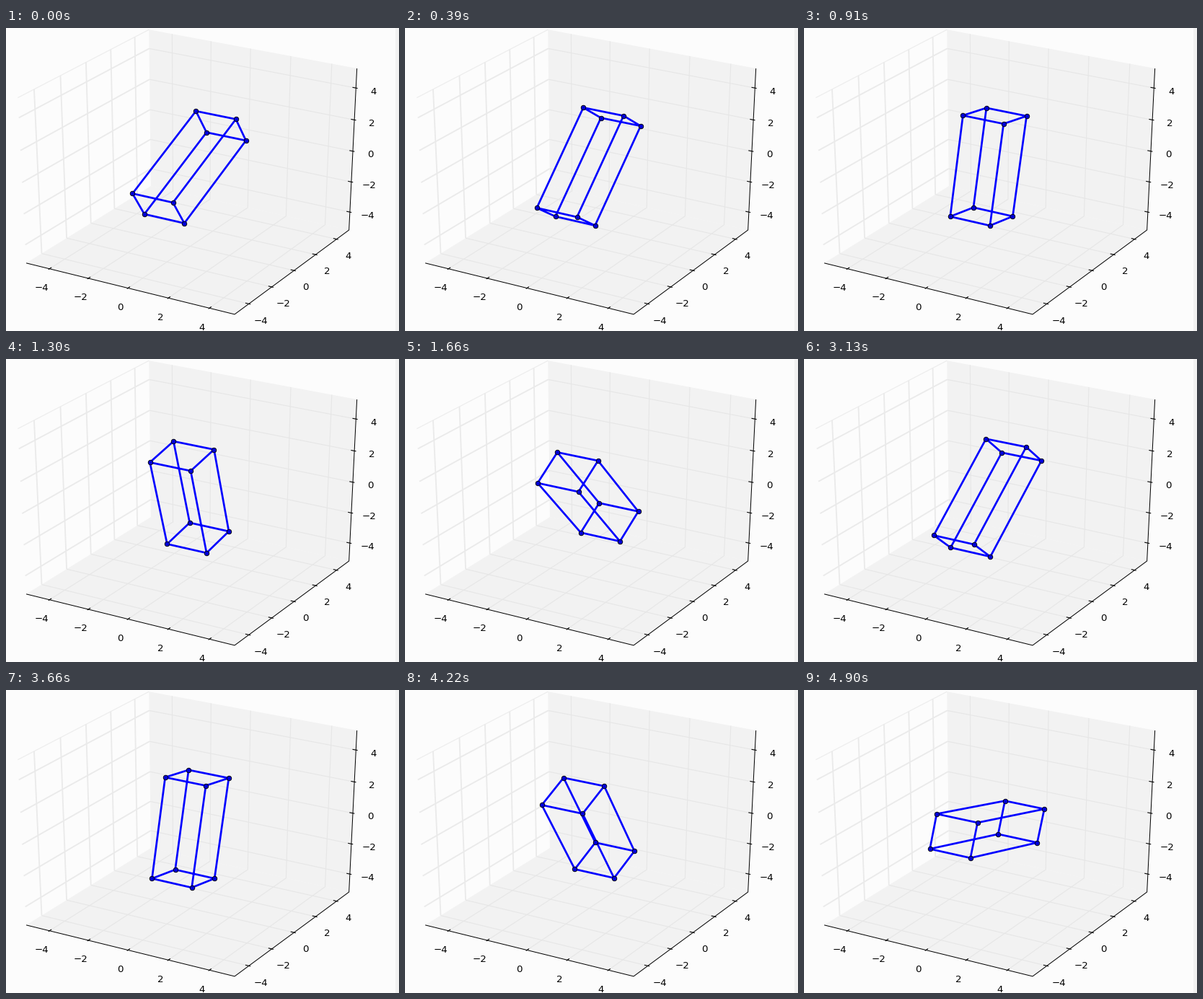
A matplotlib script that plays this animation: 545x420 px, repeating every 7.25 s.

```python
import numpy as np
import matplotlib.pyplot as plt
from matplotlib.animation import FuncAnimation

W, H, DPI = 545, 420, 100
PX = 72 / DPI                      # points per pixel
LOOP, TICK = 7250, 25              # ms

BG, PANE, GRID, GRID_LEFT = "#fcfcfc", "#f2f2f2", "#e6e6e6", "#eaeaea"
EDGE = 5 + 10 / 48                 # panes lie a little outside the limits
TICKS = range(-4, 5, 2)

# Camera: view angles, distance, pixel scale and centre
AZIM, ELEV, DIST = np.radians(59.5), np.radians(28.4), 10
SCALE = np.array([3215, -2471])
CENTER = np.array([255.4, 192.1])
sa, ca, se, ce = np.sin(AZIM), np.cos(AZIM), np.sin(ELEV), np.cos(ELEV)
RIGHT = np.array([sa, ca, 0])
UP = np.array([-ca * se, sa * se, ce])
TOWARD = np.array([ca * ce, -sa * ce, se])


def project(points):
    """Map data points (n, 3) to stage pixels (n, 2)."""
    p = np.asarray(points, float) / 10
    flat = np.stack([p @ RIGHT, p @ UP], axis=-1)
    return CENTER + SCALE * flat / (DIST - p @ TOWARD)[..., None]


# Box: 2 x 6 x 2, turning about the x axis
CORNERS = np.array([(x, l, s) for x in (-1, 1) for l in (-3, 3) for s in (-1, 1)])
EDGES = [(i, i | b) for b in (1, 2, 4) for i in range(8) if not i & b]


def step_times():
    """Short steps that slow down slightly, with a longer wait between runs."""
    times = [0]
    for count in (6, 3, 6, 3, 3, 2, 2, 3, 2, 2, 2, 3):
        for k in range(count):
            wait = 120 + 0.2 * len(times) if k else 150
            times.append(times[-1] + wait)
    return np.array(times)


STEPS = step_times()


def turn(ms):
    """Angle of the long side, gaining speed and then easing off."""
    t = ms / 1000
    return np.radians(27.7 + 53.8 * t + 3.744 * t**2 - 0.32 * t**3)


def box_at(ms):
    a = turn(ms)
    x, l, s = CORNERS.T
    return project(np.stack([x, l * np.cos(a) - s * np.sin(a),
                             l * np.sin(a) + s * np.cos(a)], axis=-1))


fig = plt.figure(figsize=(W / DPI, H / DPI), dpi=DPI, facecolor=BG)
ax = fig.add_axes([0, 0, 1, 1])
ax.set_xlim(0, W)
ax.set_ylim(H, 0)
ax.axis("off")


def polyline(points, color, width, z):
    ax.plot(*project(points).T, color=color, lw=width * PX, zorder=z,
            solid_capstyle="butt")


def pane(points):
    ax.fill(*project(points).T, color=PANE, lw=0, zorder=1)


def label(value, at, dx, dy):
    x, y = project([at])[0]
    ax.text(x + dx, y + dy + 4.8, str(value).replace("-", "\u2212"),
            family="DejaVu Sans", size=13.33 * PX, ha="center",
            va="baseline", zorder=4)


e = EDGE
ax.axvspan(540, W, color=PANE, lw=0, zorder=0)
pane([(-e, -e, -e), (e, -e, -e), (e, e, -e), (-e, e, -e)])
pane([(-e, e, -e), (e, e, -e), (e, e, e), (-e, e, e)])
polyline([(-e, -e, e), (-e, e, e)], "#ececec", 1.1, 2)

for t in TICKS:
    polyline([(t, -e, -e), (t, e, -e), (t, e, e)], GRID, 1.1, 2)
    polyline([(e, t, -e), (-e, t, -e)], GRID, 1.1, 2)
    polyline([(-e, e, t), (e, e, t)], GRID, 1.1, 2)
    polyline([(-e, t, -e), (-e, t, e)], GRID_LEFT, 1.8, 2)
    polyline([(-e, -e, t), (-e, e, t)], GRID_LEFT, 1.8, 2)

polyline([(-e, -e, -e), (e, -e, -e), (e, e, -e), (e, e, e)], "black", 1, 3)
near, far = e - 0.167, e + 0.083
for t in TICKS:
    polyline([(t, -near, -e), (t, -far, -e)], "black", 1.1, 3)
    polyline([(near, t, -e), (far, t, -e)], "black", 1.1, 3)
    polyline([(near, e, t), (far, e, t)], "black", 1.1, 3)
    label(t, (t, -e, -e), -10.3, 25.6)
    label(t, (e, t, -e), 16.4, 22.4)
    label(t, (e, e, t), 24.5, 3.9)

wire, = ax.plot([], [], color="blue", lw=2.7 * PX, zorder=5)
dots, = ax.plot([], [], "o", ms=6.5 * PX, mfc="#0000d8", mec="black",
                mew=0.9 * PX, zorder=6)


def update(frame):
    step = np.searchsorted(STEPS, frame * TICK + 20, side="right") - 1
    pts = box_at(STEPS[step])
    gap = [np.nan, np.nan]
    path = np.array([p for i, j in EDGES for p in (pts[i], pts[j], gap)])
    wire.set_data(*path.T)
    dots.set_data(*pts.T)
    return wire, dots


anim = FuncAnimation(fig, update, frames=LOOP // TICK, interval=TICK,
                     init_func=lambda: update(0), blit=True, repeat=True,
                     repeat_delay=0)
plt.show()
```
